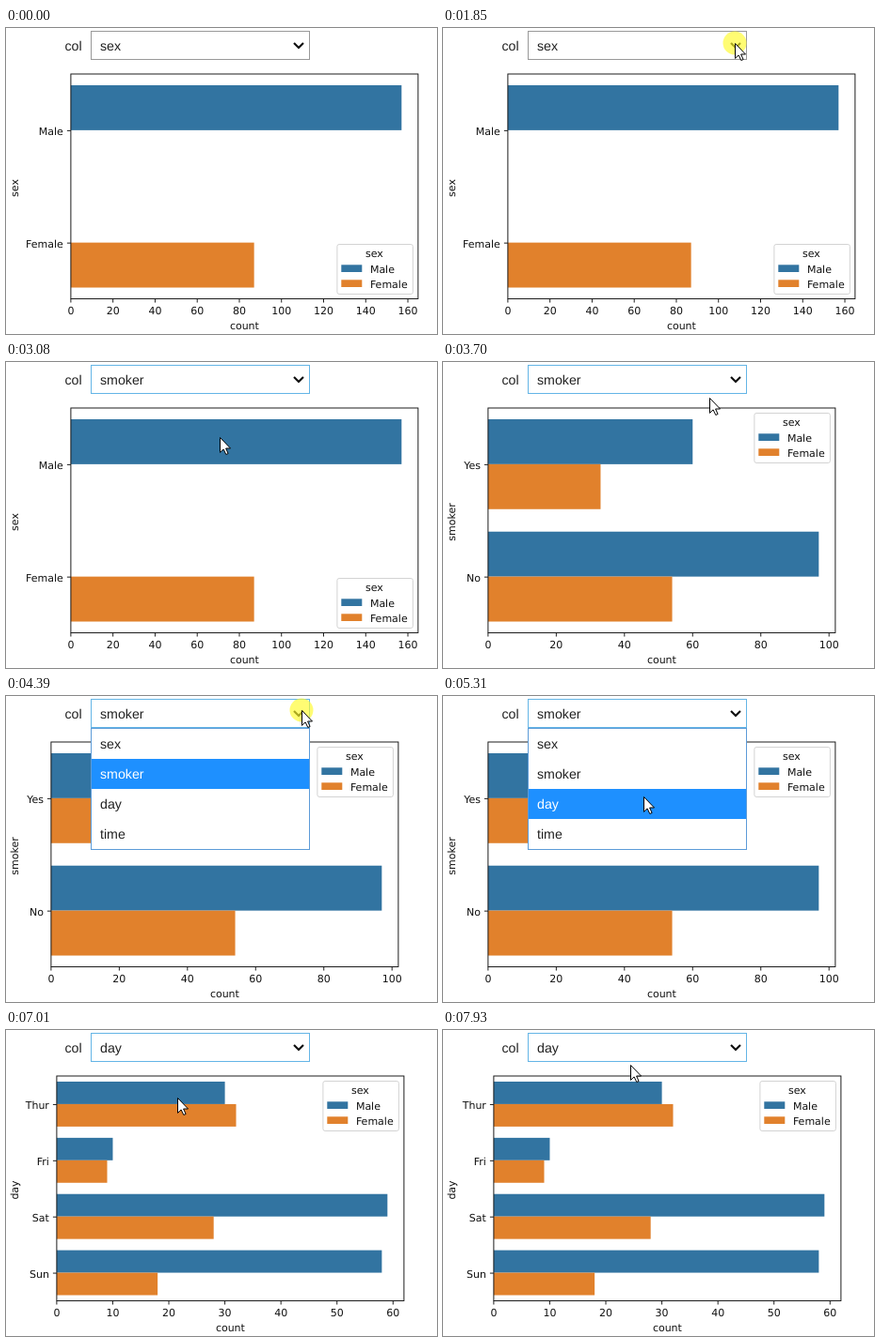
Recreate the animation shown at these times as an HTML page. Size 458 by 326 pixels, loop 8 s.

```html
<!DOCTYPE html>
<html lang="en">
<head>
<meta charset="utf-8">
<title>Count plot with a column picker</title>
<style>
  html, body { margin: 0; width: 100%; height: 100%; overflow: hidden; background: #fff; }
  svg { display: block; width: 458px; height: 326px; text-rendering: geometricPrecision; }
  .plot { font: 11px "DejaVu Sans", sans-serif; fill: #111; }
  .ui { font: 14.2px "Liberation Sans", Arial, sans-serif; fill: #222; }
  .line { fill: none; stroke: #111; stroke-width: .95; }
</style>
</head>
<body>
<svg id="stage" viewBox="0 0 458 326"></svg>
<script>
const FPS = 13;
const LOOP = 8000;
const COLORS = ['#3274a1', '#e1812c'];
const SERIES = ['Male', 'Female'];
const OPTIONS = ['sex', 'smoker', 'day', 'time'];
const ROW_TOP = 35, ROW_HEIGHT = 32;

const CHARTS = [
  { name: 'sex', left: 68.9, legendLow: true, rows: { Male: [157, 0], Female: [0, 87] } },
  { name: 'smoker', left: 47.9, rows: { Yes: [60, 33], No: [97, 54] } },
  { name: 'day', left: 53.9, rows: { Thur: [30, 32], Fri: [10, 9], Sat: [59, 28], Sun: [58, 18] } },
];

// Times below count in ticks of 1 / FPS seconds.
const START = { x: 434, y: 115 };
const MOVES = [
  { first: 11, last: 17, x: 301, y: 15 },
  { first: 19, last: 21, x: 310, y: 16 },
  { first: 32, last: 37, x: 227, y: 80 },
  { first: 45, last: 55, x: 314, y: 15 },
  { first: 63, last: 72, x: 209, y: 115, bend: .09 },
  { first: 80, last: 84, x: 274, y: 81, bend: .12 },
  { first: 88, last: 92, x: 180, y: 75, bend: .3 },
  { first: 93, last: 98, x: 258, y: 145, bend: -.1 },
  { first: 99, last: 103, x: 199, y: 37 },
];
const VISITS = [
  { press: 24, pick: 40, redraw: 42 },
  { press: 56, pick: 74, redraw: 77 },
];

const stage = document.getElementById('stage');

function add(parent, tag, attrs = {}, text) {
  const node = document.createElementNS('http://www.w3.org/2000/svg', tag);
  for (const key in attrs) node.setAttribute(key, attrs[key]);
  if (text !== undefined) node.textContent = text;
  parent.appendChild(node);
  return node;
}
const rect = (parent, x, y, width, height, attrs) =>
  add(parent, 'rect', { x, y, width, height, ...attrs });
const label = (parent, x, y, text, anchor = 'start', attrs = {}) =>
  add(parent, 'text', { x, y, 'text-anchor': anchor, ...attrs }, text);
const show = (node, on) => { node.style.display = on ? '' : 'none'; };

function drawLegend(group, left, top) {
  rect(group, left, top, 80.5, 53, { rx: 2.2, fill: '#fff', 'fill-opacity': .8, stroke: '#d3d3d3' });
  label(group, left + 39.5, top + 13.5, 'sex', 'middle');
  SERIES.forEach((name, i) => {
    const base = top + 30.5 + 16 * i;
    rect(group, left + 4.4, base - 8.7, 22, 7.7, { fill: COLORS[i] });
    label(group, left + 35, base, name);
  });
}

function drawChart({ name, left, legendLow, rows }) {
  const group = add(stage, 'g', { class: 'plot' });
  const top = 49, width = 369, height = 239.5, bottom = top + height;
  const entries = Object.entries(rows);
  const limit = Math.max(...Object.values(rows).flat()) * 1.05;
  const spacing = limit > 80 ? 20 : 10;
  const scale = width / limit;
  const band = height / entries.length;
  let ticks = '';

  entries.forEach(([category, values], row) => {
    const center = top + band * (row + .5);
    values.forEach((value, i) =>
      rect(group, left, center + (i - 1) * band * .4, value * scale, band * .4, { fill: COLORS[i] }));
    ticks += `M${left} ${center + .5}h-4`;
    label(group, left - 8, center + 5, category, 'end');
  });
  for (let value = 0; value <= limit; value += spacing) {
    const x = left + value * scale;
    ticks += `M${x} ${bottom}v4`;
    label(group, x, 305, value, 'middle');
  }
  rect(group, left, top, width, height, { class: 'line' });
  add(group, 'path', { class: 'line', d: ticks });
  label(group, left + width / 2, 321, 'count', 'middle');
  label(group, 0, 0, name, 'middle', { transform: 'translate(13 170.5) rotate(-90)' });
  drawLegend(group, left + width - 86, legendLow ? 230.5 : 54.5);
  return group;
}

const charts = CHARTS.map(drawChart);

const picker = add(stage, 'g', { class: 'ui' });
label(picker, 62.5, 24, 'col');
const field = rect(picker, 90.5, 3.5, 232, 30, { fill: '#fff' });
const fieldText = label(picker, 100, 24, '');
add(picker, 'path', { d: 'M306 16l5 5 5-5', fill: 'none', stroke: '#111', 'stroke-width': 2.2 });

const menu = add(stage, 'g', { class: 'ui' });
rect(menu, 90.5, 34.5, 232, 129, { fill: '#fff', stroke: '#5c9bd8' });
const marker = rect(menu, 91, ROW_TOP, 231, ROW_HEIGHT, { fill: '#1e90ff' });
const optionTexts = OPTIONS.map((name, i) => label(menu, 100, 56 + i * ROW_HEIGHT, name));

const pointer = add(stage, 'g');
const halo = add(pointer, 'circle', { r: 12.5, fill: '#fffa28', 'fill-opacity': .65 });
add(pointer, 'path', {
  d: 'M.5.5V16.4l3.6-3.5 2.7 5.6 2.3-1-2.5-5.5H11.5Z', fill: '#fff', stroke: '#000',
});

// Ease-out along a line that bulges sideways by `bend` times its length.
function glide(from, to, u) {
  const eased = 1 - (1 - u) ** 2.3;
  const bulge = 4 * eased * (1 - eased) * (to.bend || 0);
  const dx = to.x - from.x, dy = to.y - from.y;
  return {
    x: Math.round(from.x + dx * eased - dy * bulge),
    y: Math.round(from.y + dy * eased + dx * bulge),
  };
}

function pointerAt(tick) {
  const i = MOVES.filter(move => tick >= move.first).length - 1;
  if (i < 0) return START;
  const { first, last } = MOVES[i];
  const u = Math.min(1, (tick - first + 1) / (last - first + 1));
  return glide(MOVES[i - 1] || START, MOVES[i], u);
}

function render(time) {
  const tick = Math.floor(time * FPS / 1000 + .2);
  const { x, y } = pointerAt(tick);
  const countPast = key => VISITS.filter(visit => tick >= visit[key]).length;
  const chosen = countPast('pick');
  const drawn = countPast('redraw');
  const hovered = y < ROW_TOP ? chosen : Math.floor((y - ROW_TOP) / ROW_HEIGHT);

  charts.forEach((group, i) => show(group, i === drawn));
  fieldText.textContent = OPTIONS[chosen];
  field.setAttribute('stroke', tick > VISITS[0].press ? '#64b5e6' : '#999');

  show(menu, VISITS.some(({ press, pick }) => tick > press && tick < pick));
  marker.setAttribute('y', ROW_TOP + hovered * ROW_HEIGHT);
  optionTexts.forEach((node, i) => { node.style.fill = i === hovered ? '#fff' : ''; });

  show(halo, VISITS.some(({ press }) => tick >= press && tick < press + 2));
  show(pointer, tick >= MOVES[0].first);
  pointer.setAttribute('transform', `translate(${x} ${y})`);
}

const begin = performance.now();
function play() {
  render((performance.now() - begin) % LOOP);
  requestAnimationFrame(play);
}
play();
</script>
</body>
</html>
```
